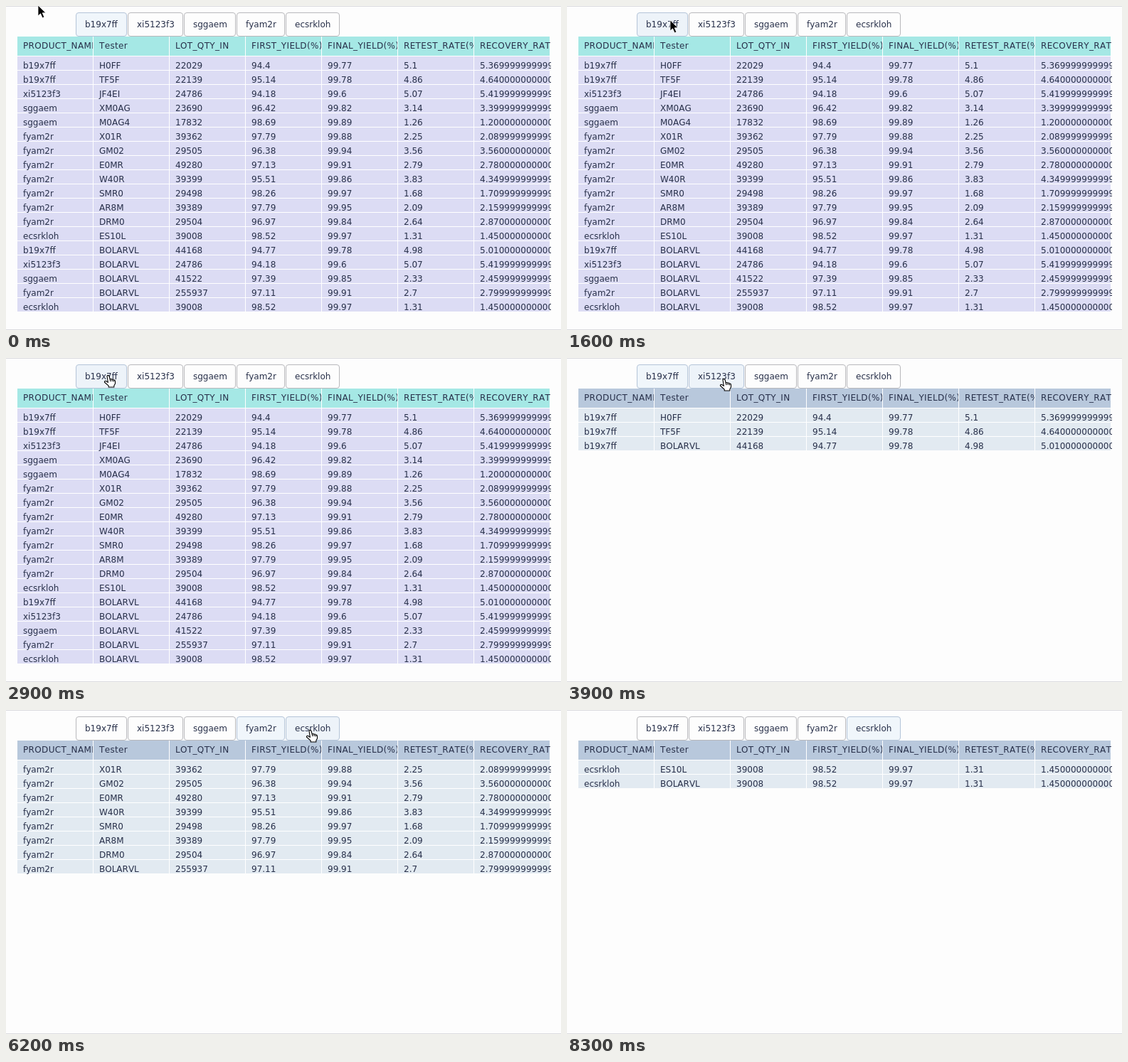
An HTML page that plays this animation: 780 by 456 pixels, repeating every 8400 ms.

```html
<!DOCTYPE html>
<html lang="en">
<head>
<meta charset="utf-8">
<title>Yield table</title>
<style>
html, body { margin: 0; width: 100%; height: 100%; overflow: hidden; background: #fdfdfd; }
svg { display: block; width: 780px; height: 456px; }
text {
  font: 12px "DejaVu Sans", Verdana, sans-serif;
  font-kerning: none;
  fill: #28304a;
  white-space: pre;
}
.head { letter-spacing: .35px; }
</style>
</head>
<body>
<svg id="stage" viewBox="0 0 780 456"></svg>
<script>
const LOOP = 8400, STEP = 100;
const LEFT = 16, COL = 107, ROW = 20, BODY = 71;
const stage = document.getElementById('stage');

const names = ['b19x7ff', 'xi5123f3', 'sggaem', 'fyam2r', 'ecsrkloh'];
const tabEdges = [[98, 170], [171, 249], [250, 323], [324, 392], [393, 469]];
const heads = ['PRODUCT_NAME', 'Tester', 'LOT_QTY_IN', 'FIRST_YIELD(%)',
  'FINAL_YIELD(%)', 'RETEST_RATE(%)', 'RECOVERY_RATE(%)'];

// product index, tester, lot size, first yield, final yield, retest rate
const data = `0 H0FF 22029 94.4 99.77 5.1
0 TF5F 22139 95.14 99.78 4.86
1 JF4EI 24786 94.18 99.6 5.07
2 XM0AG 23690 96.42 99.82 3.14
2 M0AG4 17832 98.69 99.89 1.26
3 X01R 39362 97.79 99.88 2.25
3 GM02 29505 96.38 99.94 3.56
3 E0MR 49280 97.13 99.91 2.79
3 W40R 39399 95.51 99.86 3.83
3 SMR0 29498 98.26 99.97 1.68
3 AR8M 39389 97.79 99.95 2.09
3 DRM0 29504 96.97 99.84 2.64
4 ES10L 39008 98.52 99.97 1.31
0 BOLARVL 44168 94.77 99.78 4.98
1 BOLARVL 24786 94.18 99.6 5.07
2 BOLARVL 41522 97.39 99.85 2.33
3 BOLARVL 255937 97.11 99.91 2.7
4 BOLARVL 39008 98.52 99.97 1.31`.split('\n').map(line => {
  const [product, ...rest] = line.split(' ');
  return { product: +product, cells: [names[product], ...rest, String(rest[3] - rest[2])] };
});

// the tabs are clicked one after another at an even pace
const FIRST_CLICK = 3200, CLICK_GAP = 820;

// pointer path: time, x, y
const path = [
  [0, 45, -1], [700, 49, 2], [1500, 145, 20], [1700, 145, 20],
  [2000, 143, 24], [3400, 143, 24], [3900, 220, 29], [4200, 220, 29],
  [4700, 281, 23], [5000, 281, 23], [5500, 357, 27], [5800, 357, 27],
  [6200, 427, 28], [7300, 427, 28], [7900, 436, -24], [LOOP, 436, -24]
];

function add(parent, tag, attrs, content) {
  const el = document.createElementNS('http://www.w3.org/2000/svg', tag);
  for (const key in attrs) el.setAttribute(key, attrs[key]);
  if (content) el.textContent = content;
  parent.appendChild(el);
  return el;
}

const box = (parent, x, y, width, height, fill) => add(parent, 'rect', { x, y, width, height, fill });

function drawRow(parent, cells, textY, style) {
  cells.forEach((value, c) => add(parent, 'text',
    { class: style, x: LEFT + COL * c + 8, y: textY, 'clip-path': `url(#col${c})` }, value));
}

function drawTable(rows, headFill, rowFill) {
  const g = add(stage, 'g', {});
  box(g, LEFT, 43, 748, BODY - 44 + ROW * rows.length, '#fff');
  heads.forEach((_, c) => {
    const x = LEFT + COL * c;
    box(g, x, 43, COL - 1, 27, headFill);
    rows.forEach((_, r) => box(g, x, BODY + ROW * r, COL - 1, ROW - 1, rowFill));
  });
  drawRow(g, heads, 60, 'head');
  rows.forEach((row, r) => drawRow(g, row.cells, 88 + ROW * r, 'cell'));
  return g;
}

const defs = add(stage, 'defs', {});
heads.forEach((_, c) => {
  const clip = add(defs, 'clipPath', { id: 'col' + c });
  box(clip, LEFT + COL * c, 43, c === 6 ? 108 : COL - 1, 400);
});

box(stage, 0, 0, 780, 456, '#fdfdfd');
box(stage, 0, 0, 780, 1, '#dcdce0');
box(stage, 0, 455, 780, 1, '#dcdce0');

const tabs = tabEdges.map(([x0, x1], i) => {
  const shape = add(stage, 'rect',
    { x: x0 + .5, y: 9.5, width: x1 - x0 - 1, height: 33, rx: 3.5 });
  add(stage, 'text', { x: x0 + 13, y: 30 }, names[i]);
  return shape;
});

const fullTable = drawTable(data, '#a5e8e5', '#dcdcf4');
const tables = names.map((_, i) =>
  drawTable(data.filter(row => row.product === i), '#b8c8dc', '#e2eaf1'));

const pointer = add(stage, 'g', {});
const arrow = add(pointer, 'path', {
  d: 'M0 0V15L3.5 11.8L6.2 17.8L8.8 16.6L6.2 10.8H11Z',
  fill: '#000', stroke: '#fff', 'stroke-width': .8
});
const hand = add(pointer, 'path', {
  d: 'M-1 1.5Q.3-.8 2 1.5L3.2 6Q5 4.8 5.8 6.4Q7.5 5.3 8.3 7.2Q10.2 6.6 10.5 8.8V12L8.8 15V17H1.2V15.2L-4.6 10Q-4.5 7.8-2.3 8.5L.4 10.4Z' +
    'M3.2 6L4 9M5.8 6.4L6.4 9M8.3 7.2L8.6 9.4',
  fill: '#fff', stroke: '#000', 'stroke-width': 1.1, 'stroke-linejoin': 'round'
});

function pointerAt(t) {
  const i = path.findIndex(p => p[0] > t);
  const [t0, x0, y0] = path[i - 1], [t1, x1, y1] = path[i];
  const u = (t - t0) / (t1 - t0), k = u * u * (3 - 2 * u);
  return [Math.round(x0 + (x1 - x0) * k), Math.round(y0 + (y1 - y0) * k)];
}

const show = (el, on) => el.setAttribute('display', on ? 'inline' : 'none');

function render(now) {
  const t = Math.floor(now % LOOP / STEP) * STEP;
  const selected = Math.min(Math.floor((t - FIRST_CLICK) / CLICK_GAP), names.length - 1);
  const [x, y] = pointerAt(t);

  show(fullTable, selected < 0);
  tables.forEach((table, i) => show(table, i === selected));

  tabs.forEach((tab, i) => {
    const [x0, x1] = tabEdges[i];
    const hover = x >= x0 && x < x1 && y >= 9 && y < 43;
    const active = i === Math.max(selected, 0);
    tab.setAttribute('fill', hover ? '#edf3f9' : active ? '#f0f6fb' : '#fdfdfd');
    tab.setAttribute('stroke', hover || active ? '#b4c4d8' : '#b8b8bc');
  });

  pointer.setAttribute('transform', `translate(${x} ${y})`);
  const overTab = t > 1700 && y >= 9;
  show(hand, overTab);
  show(arrow, !overTab);
}

const start = performance.now();
function tick() {
  render(performance.now() - start);
  requestAnimationFrame(tick);
}
tick();
</script>
</body>
</html>
```
